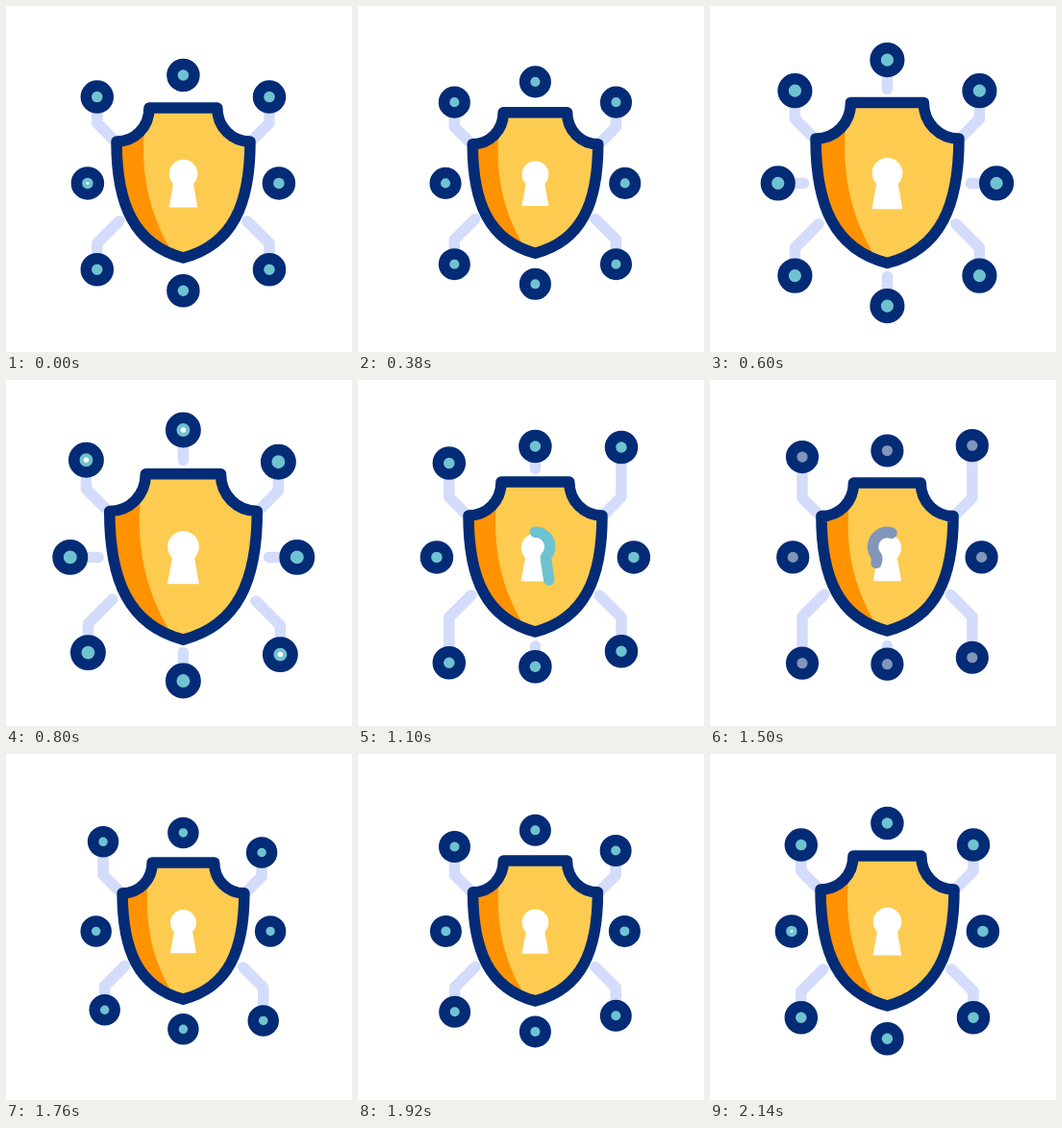
These frames come from a looping animation (360 px wide and 360 px high, 2.4 s). An HTML page:

```html
<!DOCTYPE html>
<html lang="en">
<head>
<meta charset="utf-8">
<title>Shield network</title>
<style>
  html, body { margin: 0; width: 100%; height: 100%; overflow: hidden; background: #fff; }
  svg { display: block; width: 100vw; height: 100vh; }
</style>
</head>
<body>
<svg viewBox="0 0 360 360">
  <defs>
    <path id="outline" d="M149 106H219.8C219.8 126 235 141 254 141C254 206 236 248.5 184.4 262C133 248.5 115 206 115 141C134 141 149 126 149 106Z"/>
    <clipPath id="inside"><use href="#outline"/></clipPath>
  </defs>
  <g id="scene" stroke-linecap="round" stroke-linejoin="round">
    <g id="links" fill="none" stroke="#d3dcfb"></g>
    <use href="#outline" fill="#fdcb50" stroke="none"/>
    <path clip-path="url(#inside)" fill="#ff9200" d="M145 118C139 170 147 214 174 258V270H100V118Z"/>
    <use href="#outline" fill="none" stroke="#042b76"/>
    <path fill="#fff" d="M174 185A14.8 14.8 0 1 1 195 185L199.3 209.5H169.5Z"/>
    <path id="sweep" fill="none" pathLength="100"
      d="M198.8 208L195.5 187Q195 184 197 182A15.2 15.2 0 1 0 172 182Q174 184 173.5 187L170 208"/>
    <g id="nodes" stroke="#042b76"></g>
  </g>
</svg>
<script>
const LOOP = 2400, C = 184.4, STROKE = 11.5, TEAL = '#6fc3d0', GREY = '#8196b8';
const $ = id => document.getElementById(id);

function make(parent, tag, attrs = {}) {
  const el = document.createElementNS('http://www.w3.org/2000/svg', tag);
  set(el, attrs);
  return parent.appendChild(el);
}
function set(el, attrs) {
  for (const key in attrs) el.setAttribute(key, attrs[key]);
}

// Smooth curve through [time, value] points, flat at the extremes
function curve(...points) {
  const slope = points.map(([t, v], i) => {
    const a = points[i - 1], b = points[i + 1];
    return !a || !b || (v - a[1]) * (b[1] - v) <= 0 ? 0 : (b[1] - a[1]) / (b[0] - a[0]);
  });
  return t => {
    if (t <= points[0][0]) return points[0][1];
    const i = points.findIndex(p => p[0] >= t);
    if (i < 0) return points[points.length - 1][1];
    const [t0, v0] = points[i - 1], [t1, v1] = points[i];
    const d = t1 - t0, u = (t - t0) / d, w = 1 - u;
    return w * w * (1 + 2 * u) * v0 + u * u * (3 - 2 * u) * v1
      + d * u * w * (w * slope[i - 1] - u * slope[i]);
  };
}

const scale = curve([120, 1], [340, .93], [380, .938], [740, 1.115], [800, 1.105], [1100, 1],
  [1310, 1.09], [1500, .987], [1760, .912], [1800, .908], [2140, 1]);
const head = curve([880, 0], [1100, 50], [1500, 85], [1690, 100]);
const tail = curve([1100, 0], [1500, 46], [1730, 100]);
const drift = curve([620, 0], [800, 1.8], [960, 0], [1600, 0], [1760, 1.8], [1960, 0]);

const reach = (peak, later, mid, second, rest = 0) =>
  curve([400, 0], [690, peak], [800, later], [1100, mid], [1310, second], [1500, rest], [1700, 0]);
const early = (mid, high) =>
  curve([800, 0], [1100, mid], [1300, high], [1500, high], [1730, 0]);
const late = curve([850, 0], [1100, 8], [1400, 16.5], [1500, 16], [1760, 10.5], [2080, 0]);

// Corner nodes slide vertically, the others along their axis
const nodes = [
  { x: -1, y: -1, corner: true, reach: late, drifts: true, glint: true },
  { x: 1, y: -1, corner: true, reach: early(24.5, 28) },
  { x: -1, y: 1, corner: true, reach: early(20, 22) },
  { x: 1, y: 1, corner: true, reach: late, drifts: true, glint: true },
  { x: -1, y: 0, base: 99.5, reach: reach(8.5, 7, 3, 7) },
  { x: 1, y: 0, base: 99.5, reach: reach(8.5, 7.7, 3, 9) },
  { x: 0, y: -1, base: 112.4, reach: reach(9.5, 7.5, 3, 7.5), glint: true },
  { x: 0, y: 1, base: 111.8, reach: reach(9.5, 4.7, 2, 2, 1) },
];
nodes[4].restGlint = true;
for (const n of nodes) {
  n.link = make($('links'), 'path');
  n.group = make($('nodes'), 'g');
  n.disc = make(n.group, 'circle', { r: STROKE });
  n.shine = make(n.group, 'circle', { fill: '#fff', stroke: 'none' });
}

function placeCorner(n, t) {
  const d = n.drifts ? drift(t) : 0;
  const x = C + n.x * (89.6 + d), y = C + n.y * (89.8 + d + n.reach(t));
  const bendY = C + n.y * (62.5 + d), run = n.y < 0 ? 18 : 23;
  set(n.link, { d: `M${x} ${y}V${bendY}l${-n.x * run} ${-n.y * run}` });
  return [x, y];
}

function placeSide(n, t) {
  const ext = n.reach(t), r = n.base + ext;
  const stub = n.y ? (ext > .3 ? Math.min(17, 6 + ext * 2) : 0)
    : Math.max(0, Math.min(15, (ext - 3) * 3.75));
  const inner = r - 11.5 - stub;
  const x = C + n.x * r, y = C + n.y * r;
  set(n.link, {
    d: `M${x} ${y}L${C + n.x * inner} ${C + n.y * inner}`,
    visibility: stub > 0 ? 'visible' : 'hidden'
  });
  return [x, y];
}

function draw(t) {
  const s = scale(t), accent = t >= 1400 && t < 1640 ? GREY : TEAL;
  // Shapes scale while line weights stay constant
  set($('scene'), {
    transform: `translate(${C} ${C}) scale(${s}) translate(${-C} ${-C})`,
    'stroke-width': STROKE / s
  });
  const a = tail(t), b = head(t);
  set($('sweep'), {
    stroke: accent,
    'stroke-dasharray': `${b - a} 300`,
    'stroke-dashoffset': -a,
    visibility: b - a > .5 ? 'visible' : 'hidden'
  });
  const resting = t < 120 || t >= 2140, stretched = t >= 780 && t < 820;
  for (const n of nodes) {
    const [x, y] = n.corner ? placeCorner(n, t) : placeSide(n, t);
    set(n.group, { transform: `translate(${x} ${y})` });
    set(n.disc, { fill: accent });
    set(n.shine, { r: n.glint && stretched ? 2.5 : n.restGlint && resting ? 1.4 : 0 });
  }
}

const start = performance.now();
function tick() {
  draw((performance.now() - start) % LOOP);
  requestAnimationFrame(tick);
}
tick();
</script>
</body>
</html>
```
